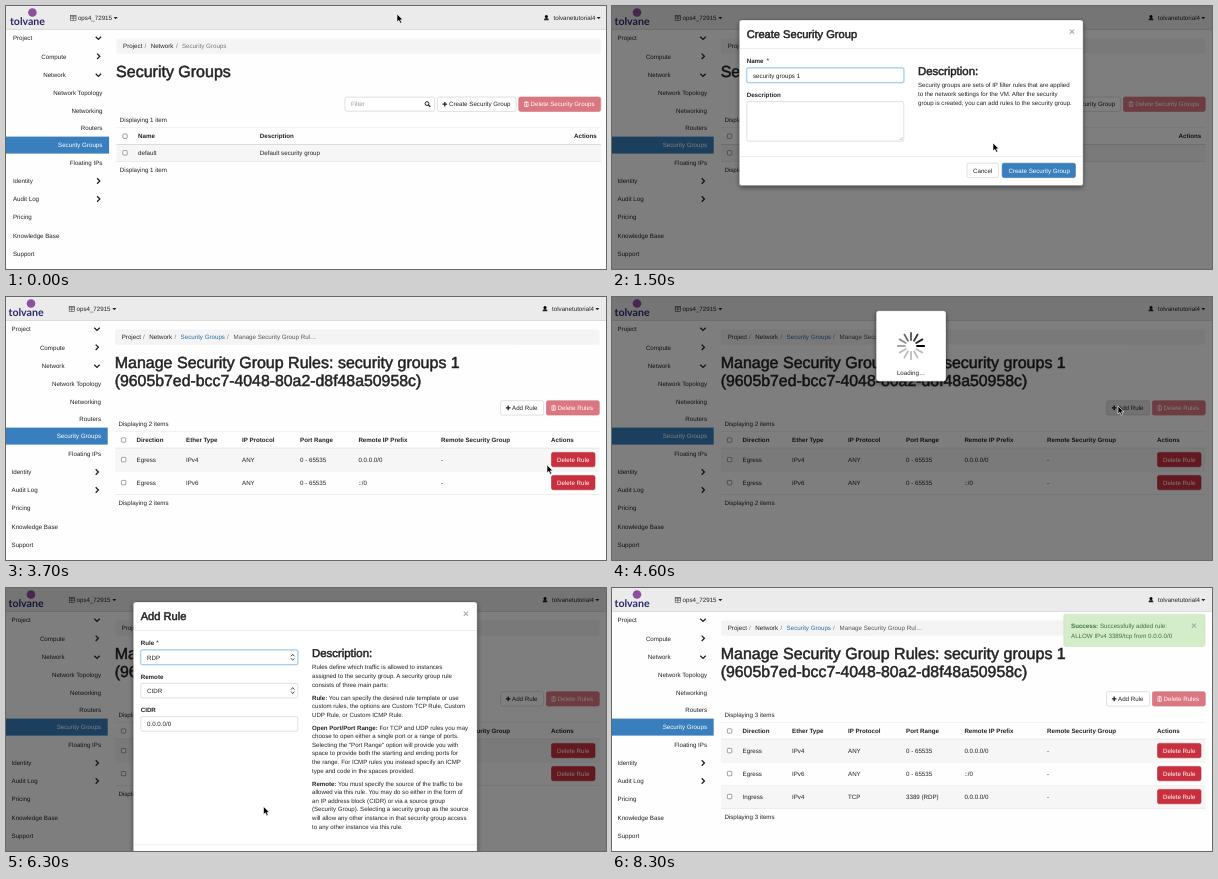
Write an HTML page that moves like this. It is 600 px wide and 263 px high and loops after 8600 ms.

```html
<!DOCTYPE html>
<html lang="en">
<head>
<meta charset="utf-8">
<title>Security groups walkthrough</title>
<style>
html, body { margin: 0; height: 100%; overflow: hidden; background: #fefefe }
svg { display: block; width: 100%; height: 100% }
text { font-family: "Liberation Sans", Arial, sans-serif; text-rendering: geometricPrecision; white-space: pre }
.b { font-weight: 700 }
.h { stroke: #222; stroke-width: .5 }
.m { stroke: #fff; stroke-width: .15 }
</style>
</head>
<body>
<svg id="stage" viewBox="0 0 600 263"></svg>
<script>
const INK = '#222', BLUE = '#3a7fbd', RED = '#c9303f', GREY = '#777', LINE = '#ccc', EDGE = 'rgba(0,0,0,.3)';

// y is the middle of the capitals
const text = (x, y, s, o = {}) => {
  const { size = 6.2, fill = INK, cls = '', anchor = 'start', id = '' } = o;
  return `<text id="${id}" class="${cls}" x="${x}" y="${y + size * .36}" font-size="${size}" fill="${fill}" text-anchor="${anchor}">${s}</text>`;
};
const bold = (x, y, s, o) => text(x, y, s, { cls: 'b', ...o });
const heading = (x, y, s, size) => text(x, y, s, { size, cls: 'h' });
const strong = s => `<tspan class="b">${s}</tspan>`;
const rect = (x, y, w, h, fill, stroke = 'none', r = 0, extra = '') =>
  `<rect x="${x}" y="${y}" width="${w}" height="${h}" fill="${fill}" stroke="${stroke}" stroke-width=".6" rx="${r}" ${extra}/>`;
const path = (d, stroke = INK, w = 1, fill = 'none') =>
  `<path d="${d}" fill="${fill}" stroke="${stroke}" stroke-width="${w}"/>`;
const group = (id, s, extra = '') => `<g id="${id}" ${extra}>${s}</g>`;
const lines = (x, y, step, list) => list.map((s, i) => text(x, y + i * step, s, { size: 6.1 })).join('');

const caret = (x, y) => path(`M${x - 2} ${y - 1}h4l-2 2.2z`, 'none', 0, INK);
const plus = (x, y) => path(`M${x - 2.3} ${y}h4.6M${x} ${y - 2.3}v4.6`, INK, 1.3);
const trash = (x, y) => path(`M${x - 2.3} ${y - 1.8}h4.6M${x - .8} ${y - 2.5}h1.6`, '#fff', .8) +
  path(`M${x - 1.7} ${y - .9}v3.3h3.4v-3.3M${x} ${y - .9}v3`, '#fff', .7);
const check = y => rect(115.4, y - 2.2, 4.4, 4.4, '#fff', '#666', .8);
const chevron = (x, y, down) => path(down
  ? `M${x - 2.7} ${y - 1.3}l2.7 2.7 2.7-2.7` : `M${x - 1.3} ${y - 2.7}l2.7 2.7-2.7 2.7`, INK, 1.3);
const button = (x, y, w, label, tx, fill = '#fff', stroke = LINE, ink = INK) =>
  rect(x, y, w, 14.4, fill, stroke, 1.8) + text(tx, y + 7.2, label, { fill: ink });
const red = (x, y, w, label, tx) => button(x, y, w, label, tx, RED, '#b52b39', '#fff');
const close = (x, y) => bold(x, y, '×', { size: 10, fill: '#aaa', anchor: 'middle' });
const hover = (id, x, y, w) => rect(x, y, w, 14.4, '#000', 'none', 1.8, `id="${id}" opacity=".1"`);

function frame() {
  const left = [['Project', 32], ['Identity', 175], ['Audit Log', 193], ['Pricing', 211],
    ['Knowledge Base', 229.3], ['Support', 247.5]];
  const right = [['Compute', 50.3, 59], ['Network', 69, 58.5], ['Network Topology', 87, 95], ['Networking', 104.3, 95],
    ['Routers', 121.8, 95], ['Security Groups', 139.2, 95], ['Floating IPs', 156.6, 95]];
  return rect(-5, 0, 612, 23, '#ebebeb') + rect(-5, 23, 612, .7, '#cfcfcf') +
    '<circle cx="25" cy="6.5" r="4.3" fill="#8d4f9f"/>' +
    '<text x="2.5" y="19.3" font-size="10.6" fill="#2d2a6b" style="font-family:Lato,sans-serif;font-weight:700">tolvane</text>' +
    rect(63.2, 9.5, 5.4, 4.8, '#fff', '#444') + path('M63 10.2h5.8M63 12.2h5.8M65.8 10v4.3', '#444', .7) +
    text(70.5, 12, 'ops4_72915') + caret(108.3, 12) +
    '<circle cx="539" cy="10.4" r="1.5"/>' + path('M536.5 14.3q0-2.4 2.5-2.4t2.5 2.4z', 'none', 0, INK) +
    text(588, 12, 'tolvanetutorial4', { anchor: 'end' }) + caret(591.3, 12) +
    rect(-5, 130.6, 106.7, 17, BLUE) +
    left.map(([s, y]) => text(5.5, y, s)).join('') +
    right.map(([s, y, x]) => text(x, y, s, { anchor: 'end', fill: y === 139.2 ? '#fff' : INK })).join('') +
    [[32, 1], [50.3, 0], [69, 1], [175, 0], [193, 0]].map(([y, down]) => chevron(91, y, down)).join('') +
    rect(109, 32.4, 484.5, 15.4, '#f4f4f4', 'none', 1.8) +
    text(115.7, 40.2, 'Project') + text(137, 40.2, '/', { fill: GREY }) +
    text(143.3, 40.2, 'Network') + text(168.5, 40.2, '/', { fill: GREY });
}

const header = (y, cols) => check(y) + cols.map(([x, s]) => bold(x, y, s)).join('') +
  rect(109, y - 9, 484.5, .5, '#e4e4e4') + rect(109, y + 7.8, 484.5, .9, '#d8d8d8');
const row = (y, top, h, cells, odd) => rect(109, top, 484.5, h, odd ? '#f6f6f6' : '#fefefe') +
  rect(109, top + h - .3, 484.5, .5, '#ddd') + check(y) + cells.map(([x, s]) => text(x, y, s)).join('');

const listTop = text(174.6, 40.2, 'Security Groups', { fill: GREY }) + heading(108.7, 65.6, 'Security Groups', 16) +
  rect(337.6, 91.2, 89.6, 14, '#fff', LINE, 1.8) + text(343.5, 98.2, 'Filter', { fill: '#999' }) +
  '<circle cx="419.6" cy="97.6" r="1.9" fill="none" stroke="#222" stroke-width="1"/>' + path('M421 99l2 2', INK, 1.2) +
  button(430, 91, 78.6, 'Create Security Group', 441.6) + plus(437.4, 98.2) + hover('hoverCreate', 430, 91, 78.6);
const deleteGroups = red(511.3, 91, 82, 'Delete Security Groups', 523.2) + trash(519, 98.2);

const listOne = listTop + `<g opacity=".65">${deleteGroups}</g>` +
  text(112.4, 113.6, 'Displaying 1 item') +
  header(130.2, [[130.6, 'Name'], [252.4, 'Description']]) + bold(589.3, 130.2, 'Actions', { anchor: 'end' }) +
  row(146.8, 139, 16.8, [[130.6, 'default'], [252.4, 'Default security group']], true) +
  text(112.4, 163.6, 'Displaying 1 item');

const listTwo = listTop + deleteGroups + text(112.4, 113.6, 'Displaying 2 items') +
  header(130.2, [[130.6, 'Name'], [309.6, 'Description'], [531, 'Actions']]) +
  row(146.8, 139, 17, [[130.6, 'default'], [309.6, 'Default security group']], true) +
  row(166.6, 156, 20.4, [[130.6, 'security groups 1']], false) +
  rect(531.3, 159.6, 57.6, 14, '#fff', LINE, 1.8) + rect(577.8, 159.6, .6, 14, LINE) +
  text(536.5, 166.6, 'Manage Rules', { size: 5.7 }) + caret(583.5, 166.6) +
  hover('hoverManage', 531.3, 159.4, 46.5) + text(112.4, 186, 'Displaying 2 items');

const COLS = [130.6, 180, 236, 294, 352.4, 435];
const RULES = [['Egress', 'IPv4', 'ANY', '0 - 65535', '0.0.0.0/0', '-'],
  ['Egress', 'IPv6', 'ANY', '0 - 65535', '::/0', '-'],
  ['Ingress', 'IPv4', 'TCP', '3389 (RDP)', '0.0.0.0/0', '-']];
const ruleRow = i => {
  const y = 162.6 + 23 * i;
  return row(y, y - 11.2, 23, COLS.map((x, c) => [x, RULES[i][c]]), i % 2 === 0) + red(545.5, y - 7.2, 43.5, 'Delete Rule', 551);
};
const managePage = text(174.6, 40.2, 'Security Groups', { fill: '#2a6da9' }) + text(221, 40.2, '/', { fill: GREY }) +
  text(227.6, 40.2, 'Manage Security Group Rul…', { fill: '#555' }) +
  heading(108.7, 65.6, 'Manage Security Group Rules: security groups 1', 16) +
  heading(108.7, 83, '(9605b7ed-bcc7-4048-80a2-d8f48a50958c)', 15.85) +
  button(494.6, 103.7, 43, 'Add Rule', 506) + plus(502.2, 110.9) + hover('hoverAdd', 494.6, 103.7, 43) +
  `<g opacity=".65">${red(540.3, 103.7, 53, 'Delete Rules', 551.6) + trash(547.6, 110.9)}</g>` +
  header(143, ['Direction', 'Ether Type', 'IP Protocol', 'Port Range', 'Remote IP Prefix', 'Remote Security Group']
    .map((s, i) => [COLS[i], s]).concat([[545, 'Actions']])) + ruleRow(0) + ruleRow(1);
const count = (n, y) => text(112.4, 126.6, `Displaying ${n} items`) + text(112.4, y, `Displaying ${n} items`);

const alertBox = (a, b) => rect(451.8, 26.2, 141.2, 32.2, '#d3ecc9', '#c8e3ba', 1.8) +
  [strong('Success: ') + a, b].map((s, i) => text(459, 38 + 9.6 * i, s, { fill: '#3c763d' })).join('') + close(582, 37.6);

const modal = (title, h) => rect(127.3, 14, 343.8, h, '#fff', EDGE, 2.6, 'filter="url(#shadow)"') +
  heading(134.7, 28.4, title, 11.1) + close(460, 25) + rect(127.6, 42.2, 343.2, .5, '#ddd') +
  heading(306, 65.3, 'Description:', 11.4);
const field = (label, y, h = 14.6, value = '', focus = false) => bold(134.7, y, label) +
  (focus ? rect(133.8, y + 6, 159, h + 2, '#d3e8fa', 'none', 2.4) : '') +
  rect(134.8, y + 7, 157, h, '#fff', focus ? '#66afe9' : LINE, 1.8) + text(141, y + 14.4, value);
const arrows = y => path(`M285 ${y - 1}l1.7-2 1.7 2M285 ${y + 1}l1.7 2 1.7-2`, INK, .8);
const star = x => text(x, 54, '*', { fill: '#2c3e70', size: 7 });

const createModal = modal('Create Security Group', 165.6) + field('Name', 55, 14.6, '', true) + star(154.4) +
  text(141, 69.4, '', { id: 'typed' }) + field('Description', 88.6, 39.6) + path('M287.5 134l3-3M289.3 134l1.2-1.2', '#888', .5) +
  lines(306, 79.3, 8.6, ['Security groups are sets of IP filter rules that are applied',
    'to the network settings for the VM. After the security', 'group is created, you can add rules to the security group.']) +
  rect(127.6, 150, 343.2, .5, '#ddd') + button(355, 157.2, 31.4, 'Cancel', 361) +
  button(390.2, 157.2, 73.2, 'Create Security Group', 396.4, BLUE, '#2e6da4', '#fff');

const PARAGRAPHS = [
  [79.3, ['Rules define which traffic is allowed to instances', 'assigned to the security group. A security group rule',
    'consists of three main parts:']],
  [109.4, [strong('Rule:') + ' You can specify the desired rule template or use',
    'custom rules, the options are Custom TCP Rule, Custom', 'UDP Rule, or Custom ICMP Rule.']],
  [139.5, [strong('Open Port/Port Range:') + ' For TCP and UDP rules you may',
    'choose to open either a single port or a range of ports.', 'Selecting the "Port Range" option will provide you with',
    'space to provide both the starting and ending ports for', 'the range. For ICMP rules you instead specify an ICMP',
    'type and code in the spaces provided.']],
  [195.4, [strong('Remote:') + ' You must specify the source of the traffic to be',
    'allowed via this rule. You may do so either in the form of', 'an IP address block (CIDR) or via a source group',
    '(Security Group). Selecting a security group as the source', 'will allow any other instance in that security group access',
    'to any other instance via this rule.']]];
const form = list => list.map(([label, value], i) => field(label, 55 + 33.3 * i, 14.6, value, !i) +
  (label === 'CIDR' || label === 'Port' ? '' : arrows(69.3 + 33.3 * i))).join('') + star(150);
const addModal = modal('Add Rule', 290) + PARAGRAPHS.map(([y, list]) => lines(306, y, 8.6, list)).join('') +
  rect(127.6, 256.6, 343.2, .5, '#ddd') +
  group('tcpForm', form([['Rule', 'Custom TCP Rule'], ['Direction', 'Ingress'], ['Open Port', 'Port'], ['Port', ''],
    ['Remote', 'CIDR'], ['CIDR', '0.0.0.0/0']])) +
  group('rdpForm', form([['Rule', 'RDP'], ['Remote', 'CIDR'], ['CIDR', '0.0.0.0/0']]));

const OPTIONS = ['Custom TCP Rule', 'Custom UDP Rule', 'Custom ICMP Rule', 'Other Protocol', 'ALL ICMP', 'ALL TCP', 'ALL UDP',
  'DNS', 'HTTP', 'HTTPS', 'IMAP', 'IMAPS', 'LDAP', 'MS SQL', 'MYSQL', 'POP3', 'POP3S', 'RDP', 'SMTP', 'SMTPS', 'SSH'];
const PITCH = 8.46;
const menu = rect(129, 62.4, 158.4, 182.8, '#595959', 'none', 2.6, 'filter="url(#shadow)"') +
  rect(129, 0, 158.4, PITCH, '#3d84e2', 'none', 0, 'id="pick"') +
  OPTIONS.map((s, i) => text(139.7, 69 + PITCH * i, s, { fill: '#fff', cls: 'm' })).join('') +
  path('M132.3 69.2l1.4 1.8 2.4-4', '#fff', .9);

const spokes = Array.from({ length: 12 }, (_, i) =>
  `<path d="M0-6V-13.2" stroke="#000" stroke-width="1.8" stroke-linecap="round" opacity="${Math.max(.25, 1 - i * .11)}" transform="rotate(${-30 * i})"/>`).join('');
const busy = rect(264.2, 13.8, 69.8, 70.4, '#fff', EDGE, 2.6, 'filter="url(#shadow)"') +
  `<g transform="translate(299 49)">${group('spinner', spokes)}</g>` + text(299, 75.4, '', { id: 'busyText', anchor: 'middle' });

document.getElementById('stage').innerHTML =
  '<filter id="shadow" x="-10%" y="-10%" width="120%" height="125%"><feDropShadow dx="0" dy="2" stdDeviation="2.5" flood-opacity=".45"/></filter>' +
  group('page', frame() + group('listOne', listOne) + group('listTwo', listTwo) +
    group('manage', managePage + group('twoRules', count(2, 205.5)) + group('threeRules', ruleRow(2) + count(3, 228.6)))) +
  group('alertGroup', alertBox('Successfully created security', 'group: security groups 1')) +
  group('alertRule', alertBox('Successfully added rule:', 'ALLOW IPv4 3389/tcp from 0.0.0.0/0')) +
  rect(0, 0, 600, 263, '#000', 'none', 0, 'id="dim" opacity=".5"') +
  group('createModal', createModal) + group('addModal', addModal) + group('menu', menu) + group('busy', busy) +
  group('cursor', path('M0 0v8l1.9-1.7 1.3 2.9 1.5-.6-1.3-2.8h2.5z', '#fff', .6, '#000'));

const $ = id => document.getElementById(id);

// [start, end) pairs in ms
const SHOWN = {
  listOne: [0, 2200], listTwo: [2200, 3700], manage: [3700, 8600], twoRules: [3700, 7600], threeRules: [7600, 8600],
  alertGroup: [2200, 3700], alertRule: [7700, 8600], dim: [600, 2200, 4600, 7600],
  createModal: [800, 2000], addModal: [5100, 6600], tcpForm: [5100, 6100], rdpForm: [6100, 6600], menu: [5400, 6100],
  busy: [600, 800, 2000, 2200, 4600, 5100, 6600, 7600],
  hoverCreate: [500, 800], hoverManage: [3100, 3700], hoverAdd: [4300, 5000], cursor: [0, 6500]
};
const ROUTE = [[0, 391, 8], [100, 391, 8], [500, 468, 97], [900, 468, 97], [1400, 381, 137], [1600, 381, 137],
  [1900, 425, 162], [2100, 425, 162], [2400, 367, 108], [2600, 367, 108], [3100, 541, 168], [3800, 541, 168],
  [4300, 506, 109], [5000, 506, 109], [5400, 225, 70], [5700, 231, 90], [6000, 215, 212], [6100, 215, 212], [6500, 300, 225]];

function cursorAt(t) {
  const i = ROUTE.findIndex(p => p[0] > t);
  if (i < 0) return ROUTE[ROUTE.length - 1].slice(1);
  const [t0, x0, y0] = ROUTE[i - 1], [t1, x1, y1] = ROUTE[i];
  const u = (t - t0) / (t1 - t0), k = u * u * (3 - 2 * u);
  return [x0 + (x1 - x0) * k, y0 + (y1 - y0) * k];
}

function draw() {
  const t = Math.floor(performance.now() % 8600 / 100) * 100;
  for (const id in SHOWN) {
    const on = SHOWN[id].some((start, i, a) => i % 2 === 0 && t >= start && t < a[i + 1]);
    $(id).style.display = on ? '' : 'none';
  }
  const [x, y] = cursorAt(t);
  $('cursor').setAttribute('transform', `translate(${x} ${y})`);
  $('page').setAttribute('transform', `translate(${t < 600 ? 1.4 : 0} 0)`);
  $('typed').textContent = 'security groups 1'.slice(0, Math.max(0, Math.round((t - 900) / 500 * 17)));
  $('pick').setAttribute('y', 64.8 + PITCH * Math.min(20, Math.max(0, Math.round((y - 71) / PITCH))));
  $('busyText').textContent = t < 1000 || t > 4000 && t < 6000 ? 'Loading…' : 'Working…';
  $('spinner').setAttribute('transform', `rotate(${30 * Math.floor(t * .012) + (t < 6000 ? 240 : 210)})`);
  requestAnimationFrame(draw);
}
draw();
</script>
</body>
</html>
```
